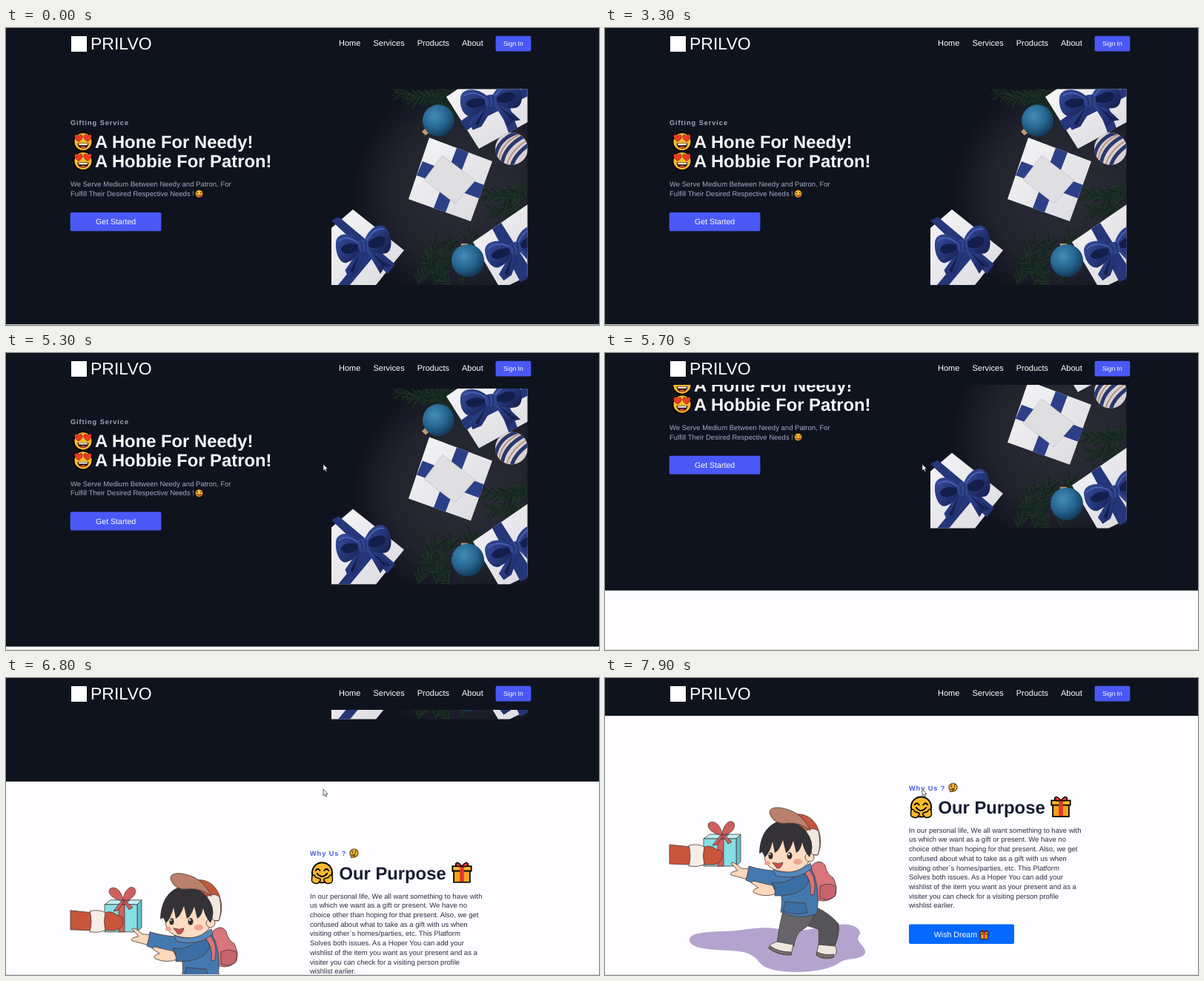
Animation of 800x401 px, one loop 8000 ms. Source, as an HTML page:

```html
<!DOCTYPE html>
<html lang="en">
<head>
<meta charset="utf-8">
<title>Gifting Service</title>
<style>
html, body { margin: 0; width: 100%; height: 100%; overflow: hidden; background: #0f131e; }
svg { display: block; }
text { font-family: "Liberation Sans", Arial, sans-serif; text-rendering: geometricPrecision; white-space: pre; }
.h { font-weight: bold; font-size: 23.8px; }
.nav { font-size: 11px; fill: #fff; }
.btn { font-size: 10.6px; fill: #fff; }
.tag { font-weight: bold; font-size: 9.2px; letter-spacing: .94px; }
.p { font-size: 9.52px; }
.ink { stroke: #4a3733; stroke-width: .8; stroke-linejoin: round; }
</style>
</head>
<body>
<svg width="800" height="401" viewBox="0 0 800 401">
<defs>
  <clipPath id="photo"><rect x="439" y="82.500" width="264.500" height="264.500"/></clipPath>
  <radialGradient id="glow" gradientUnits="userSpaceOnUse" cx="622" cy="222" r="155">
    <stop offset="0" stop-color="#2b2d37"/><stop offset=".65" stop-color="#21232d"/><stop offset="1" stop-color="#0f131e"/>
  </radialGradient>
  <radialGradient id="ball" cx=".38" cy=".35" r=".7">
    <stop offset="0" stop-color="#438cb6"/><stop offset=".55" stop-color="#266691"/><stop offset="1" stop-color="#123450"/>
  </radialGradient>
  <linearGradient id="silk" x1="0" y1="0" x2="1" y2="1">
    <stop offset="0" stop-color="#384e9d"/><stop offset=".5" stop-color="#25367a"/><stop offset="1" stop-color="#141d47"/>
  </linearGradient>
  <linearGradient id="box" x1="0" y1="0" x2="1" y2="1">
    <stop offset="0" stop-color="#f6f6f8"/><stop offset="1" stop-color="#dad9de"/>
  </linearGradient>
  <clipPath id="orb"><circle cx="682" cy="163" r="22"/></clipPath>

  <g id="bow" fill="url(#silk)">
    <path d="M-4 2L-31 28L-27 38L-15 34L5 6Z"/>
    <path d="M2 2L21 37L28 30L38 29L9 -2Z"/>
    <path d="M0 0C-10 -18 -35 -22 -40 -9C-44 6 -37 20 -28 19C-16 17 -8 10 0 0Z"/>
    <path d="M0 0C6 -20 29 -30 38 -18C45 -7 43 9 34 12C23 14 10 10 0 0Z"/>
    <path d="M-3 1C-14 -5 -27 -7 -34 1C-32 11 -16 10 -3 1ZM3 0C12 -8 26 -14 34 -6C34 4 18 8 3 0ZM-6 8L-23 29L-20 33ZM8 6L27 28L31 27Z" fill="#141e4b"/>
    <path d="M-36 -9Q-22 -17 -6 -3M6 -6Q20 -22 34 -18" fill="none" stroke="#4a61b2" stroke-width="1.800"/>
    <rect x="-8" y="-8" width="16" height="16" rx="6" fill="#30458f"/>
    <path d="M-4 -6Q0 0 -3 7M3 -6Q5 0 2 7" fill="none" stroke="#18234f"/>
  </g>

  <symbol id="love" viewBox="0 0 32 32">
    <circle cx="16" cy="16" r="14.700" fill="#fdb92d" stroke="#000" stroke-width="2"/>
    <path id="heart" d="M8.700 16C1 11 1 5 5 4.500Q8 4.300 9 7Q11 4 13.700 5.300C17 8 14 13 8.700 16Z" fill="#f03a22" stroke="#000" stroke-width=".5"/>
    <use href="#heart" transform="matrix(-1 0 0 1 32 0)"/>
    <path d="M7 18.500H25Q24 27 16 27T7 18.500Z" fill="#1b0b05"/>
    <path d="M8.500 19H23.500L22.500 21.500H9.500Z" fill="#fff"/>
    <path d="M11 25Q16 21.500 21 25Q16 28 11 25Z" fill="#e8453c"/>
  </symbol>
  <symbol id="yum" viewBox="0 0 32 32">
    <circle cx="16" cy="16" r="14.500" fill="#fdb92d" stroke="#000" stroke-width="2"/>
    <path d="M6 13Q9 8 12 13M20 13Q23 8 26 13M6 18Q16 30 26 18" fill="none" stroke="#000" stroke-width="2.500"/>
    <path d="M15 22Q24 17 25 21Q25 28 20 28T15 22Z" fill="#e23a35"/>
  </symbol>
  <symbol id="think" viewBox="0 0 32 32">
    <circle cx="16" cy="15" r="13.800" fill="#fdb92d" stroke="#000" stroke-width="2.200"/>
    <path d="M7 9Q10 6 13 8M19 7Q23 4 26 8M12 20Q17 17 22 20" fill="none" stroke="#000" stroke-width="2"/>
    <circle cx="11" cy="13" r="2"/><circle cx="21" cy="12.500" r="2"/>
    <path d="M6 30Q4 22 9 20L11 23L19 22Q20 25 14 26Q14 31 6 30Z" fill="#f39a1f" stroke="#000" stroke-width="1.600"/>
  </symbol>
  <symbol id="hug" viewBox="0 0 32 32">
    <circle cx="16" cy="15.500" r="14" fill="#fdb92d" stroke="#000" stroke-width="2"/>
    <path d="M7 12.500Q10 8 13 12.500M19 12.500Q22 8 25 12.500M9 16.500Q16 25 23 16.500" fill="none" stroke="#000" stroke-width="2" stroke-linecap="round"/>
    <path id="palm" d="M2 20Q5 17 7 22L13 24Q15 26 12 28L10 30.500Q2 31 1.500 26Z" fill="#fdb92d" stroke="#000" stroke-width="1.500"/>
    <use href="#palm" transform="matrix(-1 0 0 1 32 0)"/>
  </symbol>
  <symbol id="gift" viewBox="0 0 32 32">
    <path d="M4 13H28V31H4Z" fill="#f5a21c" stroke="#000" stroke-width="2"/>
    <path d="M2 7H30V14H2Z" fill="#fdb92d" stroke="#000" stroke-width="2"/>
    <path d="M13 8H19V30H13Z" fill="#e5332f"/>
    <path d="M16 7Q5 9 7 3Q10 -1 16 7Q22 -1 25 3Q27 9 16 7Z" fill="#e5332f" stroke="#000" stroke-width="1.600"/>
  </symbol>
</defs>

<g id="page">
  <rect width="800" height="431" fill="#0f131e"/>
  <rect y="431" width="800" height="400" fill="#fdfcff"/>

  <text class="tag" x="87" y="131" fill="#a2a9bd">Gifting Service</text>
  <use href="#love" x="90.500" y="140" width="27" height="27"/>
  <use href="#love" x="90.500" y="166" width="27" height="27"/>
  <text class="h" x="120" y="162" fill="#f6f7fb">A Hone For Needy!</text>
  <text class="h" x="120" y="188" fill="#f6f7fb">A Hobbie For Patron!</text>
  <text class="p" x="87" y="214.200" fill="#a3abc4">We Serve Medium Between Needy and Patron, For</text>
  <text class="p" x="87" y="227" fill="#a3abc4">Fulfill Their Desired Respective Needs !</text>
  <use href="#yum" x="254.800" y="218" width="11.500" height="11.500"/>
  <rect x="86.700" y="249" width="122.700" height="25.200" rx="2" fill="#4a59f6"/>
  <text class="btn" x="121" y="265.300">Get Started</text>

  <g clip-path="url(#photo)">
    <rect x="439" y="82" width="265" height="266" fill="url(#glow)"/>
    <g id="pine" fill="none" stroke-linecap="round"></g>

    <path d="M594 93L610 82H704V127L638 163Z" fill="url(#box)"/>
    <path d="M613 126L634 111L704 79V92L642 123L621 139Z" fill="#25367a"/>
    <path d="M664 104L677 100L690 135L678 141Z" fill="#25367a"/>
    <use href="#bow" transform="translate(654 98) rotate(-4)"/>

    <path d="M571 148L656 180L627 261L543 231Z" fill="url(#box)"/>
    <path d="M608 162L624 168L593 249L577 243ZM562 180L645 212L638 230L554 199Z" fill="#2c4088"/>
    <path d="M589 172L633 206L606 237L564 205Z" fill="#dfdfe2" stroke="#bdbdc5" stroke-width=".7"/>

    <path d="M468 245L537 300L499 347H439V270Z" fill="url(#box)"/>
    <path d="M439 260L449 255L525 319L515 332ZM508 274L518 282L464 347H448Z" fill="#25367a"/>
    <use href="#bow" transform="translate(482 294) rotate(-6) scale(.9 1.080)"/>

    <path d="M630 289L704 238V335L679 347H664Z" fill="url(#box)"/>
    <path d="M656 271L668 263L704 320V338L694 343Z" fill="#25367a"/>
    <use href="#bow" transform="translate(687 297) rotate(-16)"/>

    <path d="M561 140L567 134L572 140L566 145Z" fill="#c49a6c"/>
    <circle cx="583.500" cy="125" r="21.500" fill="url(#ball)"/>
    <path d="M614 291H623V297H614Z" fill="#c49a6c"/>
    <circle cx="623" cy="314" r="22" fill="url(#ball)"/>

    <circle cx="682" cy="163" r="22" fill="#d8d0d3"/>
    <g clip-path="url(#orb)" fill="none">
      <path d="M660 174Q664 149 690 141M669 184Q672 160 699 146M682 187Q686 171 706 157" stroke="#2a376c" stroke-width="5"/>
      <path d="M665 179Q668 154 695 143M675 187Q680 165 704 151" stroke="#b8957a" stroke-width="2"/>
    </g>
  </g>

  <text class="tag" x="410" y="531.500" fill="#4759dc">Why Us ?</text>
  <use href="#think" x="463" y="521.500" width="13" height="13"/>
  <use href="#hug" x="411" y="539" width="31" height="31"/>
  <text class="h" x="449.500" y="563" fill="#171c30">Our Purpose</text>
  <use href="#gift" x="600.500" y="539" width="29" height="29"/>
  <g id="purpose" class="p" fill="#2b2f42"></g>
  <rect x="410" y="712.500" width="142" height="26.500" rx="2" fill="#0568ff"/>
  <text class="btn" x="443.800" y="730">Wish Dream</text>
  <use href="#gift" x="505" y="720" width="13" height="13"/>

  <g transform="translate(0 380)">
    <path d="M114 355C112 343 140 343 158 342C190 342 205 334 235 339C270 346 285 334 305 336C325 328 346 335 344 346C335 356 352 360 351 371C347 382 325 376 314 386C292 399 240 400 218 391C205 386 207 372 180 369C150 366 118 368 114 355Z" fill="#b4a3ce"/>

    <g class="ink">
      <path d="M87 225L116 228V252L87 251Z" fill="#c9553a"/>
      <path d="M133 217L141 211H183L177 217Z" fill="#bdf0f3"/>
      <path d="M177 217L183 211V248L177 254Z" fill="#5fc0cc"/>
      <path d="M133 217H177V254H133Z" fill="#86dfe6"/>
      <path d="M152 217H160V254H152ZM152 217L160 211H167L160 217Z" fill="#d0605f"/>
      <path d="M157 212C146 211 136 202 140 196C149 190 157 202 158 211C159 199 168 189 174 196C177 204 168 212 157 212ZM156 212L145 226L151 225L159 213L166 224L171 221L160 211Z" fill="#d0605f"/>
      <path d="M130 230Q141 223 151 232Q160 233 158 240Q158 250 147 252L130 252Z" fill="#c9553a"/>
      <path d="M113 226Q125 223 134 228Q131 240 134 252Q124 256 113 254Q117 240 113 226Z" fill="#f5eee6"/>
    </g>

    <g class="ink">
      <path d="M277 255Q289 242 297 253Q299 265 308 270Q314 282 311 293Q302 304 288 300L272 275Z" fill="#d9757b"/>
      <path d="M290 281Q302 275 312 282L310 295Q299 302 290 297Z" fill="#c7646d"/>
      <path d="M262 316L288 311Q304 319 315 332Q317 345 310 362L288 361Q289 346 288 339L264 332Z" fill="#565459"/>
      <path d="M241 311L283 316Q279 334 263 342Q256 350 255 362L232 358Q235 333 241 311Z" fill="#666468"/>
      <path d="M232 356L254 360L251 374Q232 374 221 365Q221 359 232 356Z" fill="#ede6df"/>
      <path d="M288 360L311 362Q315 372 307 378Q293 381 285 374Z" fill="#ede6df"/>
      <path d="M221 365Q232 374 251 374V370Q234 370 223 362ZM285 374Q295 380 308 377L309 373Q296 375 286 370Z" fill="#77716e"/>
      <path d="M198 258L184 257Q172 246 170 250L179 260Q167 262 170 266L185 270L200 274Z" fill="#fbd7bb"/>
      <path d="M236 260Q258 266 277 255Q291 279 286 318Q262 328 237 316Q241 297 235 286Q210 282 190 273Q193 263 194 254Q217 261 236 260Z" fill="#4479b0"/>
      <path d="M226 280L208 276Q197 272 198 277L207 283Q197 286 201 290Q216 297 231 291Z" fill="#fbd7bb"/>
      <path d="M225 276Q245 279 258 266Q273 260 275 274Q267 295 229 294Q231 284 225 276Z" fill="#3a6ea4"/>
      <path d="M243 302L270 304L273 317Q256 321 240 315Z" fill="#3a6ea4"/>
      <path d="M270 255Q287 265 282 292L277 293Q280 272 266 260Z" fill="#d9757b"/>
      <path d="M227 258Q248 269 277 250L279 257Q261 274 230 267Z" fill="#5288bd"/>

      <path d="M253 184Q279 181 288 205Q294 223 287 239L272 239L246 196Z" fill="#c4573b"/>
      <path d="M270 207Q281 200 288 207Q292 226 287 239L273 238Q277 222 270 207Z" fill="#f1e8e0"/>
      <path d="M213 228Q213 199 246 201Q277 205 278 237Q276 258 250 262Q221 262 216 246Z" fill="#fcdcc2"/>
      <circle cx="276" cy="242" r="6" fill="#fcdcc2"/>
    </g>
    <path d="M208 237Q209 204 232 194Q264 190 276 214Q283 228 276 242Q269 235 266 222Q264 233 258 236L254 220Q249 235 244 236L240 219Q235 234 229 236L226 221Q223 235 216 242L212 235Z" fill="#343236"/>
    <path class="ink" d="M222 183Q221 174 235 175Q266 179 277 206Q264 195 247 196Q228 199 222 183Z" fill="#ba806b"/>
    <g fill="#332d30">
      <ellipse cx="223.500" cy="240" rx="3" ry="4.500"/><ellipse cx="249" cy="240" rx="3.500" ry="4.700"/>
    </g>
    <g fill="#fff"><circle cx="222.500" cy="238" r="1.100"/><circle cx="248" cy="238" r="1.300"/></g>
    <g fill="#f2a292"><ellipse cx="219" cy="250" rx="4" ry="3"/><ellipse cx="260" cy="248" rx="6" ry="4"/></g>
    <path class="ink" d="M226 249Q234 252 240 249Q238 258 232 257Z" fill="#cf504a"/>
  </g>
</g>

<g id="header">
  <rect width="800" height="43" fill="#0f131e"/>
  <rect x="88" y="11" width="21" height="21" fill="#fff"/>
  <text x="114" y="29" font-size="23" fill="#fff">PRILVO</text>
  <g class="nav">
    <text x="449" y="24">Home</text>
    <text x="495.500" y="24">Services</text>
    <text x="554.700" y="24">Products</text>
    <text x="615" y="24">About</text>
  </g>
  <rect x="660.600" y="10.800" width="47.700" height="20.600" rx="2" fill="#4a59f6"/>
  <text x="671" y="24.200" font-size="8.600" fill="#fff">Sign In</text>
</g>

<path id="cursor" d="M428 150V159L430 157.200L431.400 160.200L432.800 159.600L431.500 156.600H434Z" fill="#fff" stroke="#222" stroke-width=".7"/>
<rect y="400" width="800" height="1" fill="#dcdce0"/>
</svg>

<script>
const $ = id => document.getElementById(id);
const LOOP = 8000, GLIDE = 230, CURSOR_AT = 5210;

// wheel notches: start time, page offset reached
const notches = [
  [5200, 42], [5430, 85], [5640, 127], [5850, 170],
  [6200, 212], [6440, 255], [6690, 297], [6930, 339.5], [7450, 380]
];

const lines = [
  'In our personal life, We all want something to have with',
  'us which we want as a gift or present. We have no',
  'choice other than hoping for that present. Also, we get',
  'confused about what to take as a gift with us when',
  'visiting other`s homes/parties, etc. This Platform',
  'Solves both issues. As a Hoper You can add your',
  'wishlist of the item you want as your present and as a',
  'visiter you can check for a visiting person profile',
  'wishlist earlier.'
];
$('purpose').innerHTML = lines
  .map((s, i) => `<text x="410" y="${588.7 + i * 12.72}">${s}</text>`).join('');

let seed = 7;
const rnd = () => (seed = seed * 16807 % 2147483647) / 2147483647;

// a twig with needles leaning towards its tip
function twig(x1, y1, x2, y2, size) {
  const dir = Math.atan2(y2 - y1, x2 - x1);
  let out = `<path d="M${x1} ${y1}L${x2} ${y2}" stroke="#2c2623" stroke-width="1.5"/>`;
  for (let i = 0; i < 56; i++) {
    const k = i / 56, a = dir + (i % 2 ? 1 : -1) * (.35 + rnd() * .5);
    const x = x1 + (x2 - x1) * k, y = y1 + (y2 - y1) * k, r = size * (.7 + rnd() * .4);
    const tone = ['#13201c', '#182a21', '#21382a'][i % 3];
    out += `<path d="M${x.toFixed(1)} ${y.toFixed(1)}l${(r * Math.cos(a)).toFixed(1)} ${(r * Math.sin(a)).toFixed(1)}" stroke="${tone}" stroke-width="1.1"/>`;
  }
  return out;
}
$('pine').innerHTML = [
  [612, 100, 525, 87, 17], [606, 84, 545, 97, 16], [612, 118, 575, 94, 14],
  [704, 226, 650, 225, 16], [704, 244, 655, 248, 15], [704, 212, 675, 232, 14],
  [580, 347, 600, 288, 17], [556, 347, 580, 290, 16], [600, 347, 568, 315, 14], [615, 345, 628, 280, 15]
].map(t => twig(...t)).join('');

function offset(t) {
  let y = 0, from = 0;
  for (const [start, to] of notches) {
    const k = Math.min(1, Math.max(0, (t - start) / GLIDE));
    y += (to - from) * (1 - (1 - k) ** 3);
    from = to;
  }
  return y;
}

function draw(now) {
  const t = now % LOOP;
  $('page').setAttribute('transform', `translate(0 ${-offset(t).toFixed(2)})`);
  $('cursor').setAttribute('visibility', t >= CURSOR_AT ? 'visible' : 'hidden');
}

const begin = performance.now();
function tick() {
  draw(performance.now() - begin);
  requestAnimationFrame(tick);
}
tick();
</script>
</body>
</html>
```
